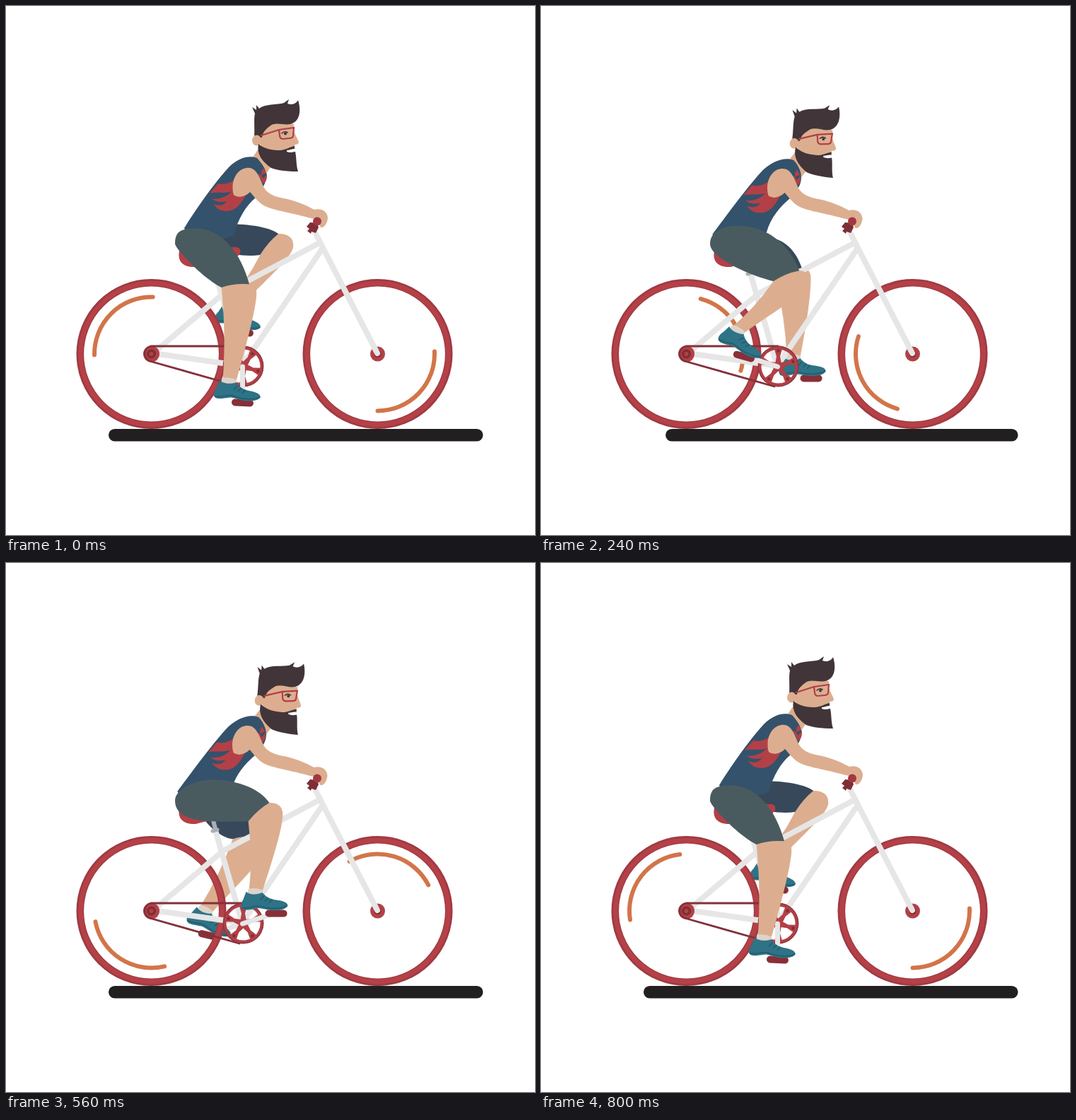
These frames come from a looping animation (748 px wide and 748 px high, 0.84 s). An HTML page:

```html
<!DOCTYPE html>
<html lang="en">
<head>
<meta charset="utf-8">
<title>Cyclist</title>
<style>
html, body { margin: 0; width: 100%; height: 100%; overflow: hidden; background: #fff; }
svg { display: block; width: 100vw; height: 100vh; }
.line { fill: none; stroke-linecap: round; }
.tube { fill: none; stroke: #e6e6e6; stroke-width: 8; stroke-linejoin: round; }
.crank { stroke-width: 7; stroke-linecap: round; }
.skin { fill: #dcae8f; }
.red { fill: #b34046; }
.dark { fill: #7f2e35; }
.hair { fill: #41353a; }
.sock { fill: #ddd3cb; }
.shoe { fill: #2e7386; }
.pedal { fill: #882f37; }
.blue { fill: #34526b; }
.ground { fill: #221f20; }
</style>
</head>
<body>
<svg viewBox="0 0 748 748" xmlns="http://www.w3.org/2000/svg">
  <defs>
    <g id="tyre">
      <circle r="100.7" class="line" stroke="#9f3a44" stroke-width="10.6"/>
      <circle r="100" class="line" stroke="#b54147" stroke-width="6.4"/>
    </g>
    <g id="foot">
      <path class="sock" d="M-10-3Q0-5 10-2L11 5-11 5Z"/>
      <path class="shoe" d="M-13 1C-9 5 1 6 10 2C14 7 20 11 28 12C38 13 46 15 46 20C44 25 35 27 26 27C18 27 10 24 4 24C-2 25-8 27-14 27C-22 26-21 18-17 12Z"/>
      <path class="line" stroke="#245b6c" stroke-width="1.6" d="M-18 24C-8 25-2 21 4 21C12 22 18 25 27 24C36 24 42 22 45 20M8 12L12 7M14 14L18 10M20 16L24 12"/>
    </g>
    <rect id="pedal" class="pedal" x="-15.5" y="-5" width="31" height="10" rx="5"/>
  </defs>

  <rect class="ground" id="road" y="598" height="17.5" rx="8.7"/>
  <rect class="ground" id="bit" y="598" height="17.5" rx="3.5" ry="5"/>

  <g id="far">
    <line class="tube crank"/>
    <use href="#pedal" class="pad"/>
    <path class="skin calf"/>
    <path class="shorts" fill="#37485a"/>
    <use href="#foot" class="boot"/>
  </g>

  <use href="#tyre" x="205.5" y="492"/>
  <use href="#tyre" x="525.5" y="492"/>
  <g class="line" stroke="#d27549" stroke-width="6">
    <path id="rear"/>
    <path id="front"/>
  </g>

  <path stroke="#a9afb5" stroke-width="6" d="M292 360L297 380"/>
  <path class="tube" d="M296 378L334 509M447 333L307 407L208 491L334 509L448 342"/>
  <path class="line" stroke="#a9afb5" stroke-width="5" d="M292 379L299 377"/>
  <path class="tube" d="M435 316L446 338"/>
  <circle class="red" cx="525.5" cy="492" r="10.5"/>
  <circle class="dark" cx="525.5" cy="492" r="5"/>
  <path class="tube" stroke-linecap="round" d="M444 334L525 491"/>
  <path class="red" d="M246 343C240 362 252 370 268 369C290 364 310 357 327 354C334 350 332 341 325 341Z"/>

  <circle class="red" cx="205.5" cy="492" r="11.5"/>
  <circle class="dark" cx="205.5" cy="492" r="6.5"/>
  <circle class="red" cx="205.5" cy="492" r="3"/>
  <path class="line" stroke="#84303a" stroke-width="2.8" d="M335 481H205A11 11 0 0 0 203 502L330 538"/>
  <g id="ring">
    <circle r="26.3" class="line" stroke="#b03f46" stroke-width="4.6"/>
    <circle r="28.3" class="line" stroke="#8e343d" stroke-width="1.2"/>
  </g>

  <g id="head">
    <path class="skin" d="M342 224L361 196L382 216L366 240Z"/>
    <path class="skin" d="M358 192L358 176C372 160 392 162 407 167L407 175C408 182 413 188 414 193C413 196 410 196 408 196L408 207L365 210Z"/>
    <path class="hair" d="M351 186C352 172 350 160 352 152L348 143L354 147L354 140L358 145C366 138 384 140 393 137L400 132L398 138C405 141 411 137 413 133C418 149 415 164 402 167C393 169 380 163 373 170C366 175 363 179 362 186Z"/>
    <ellipse class="skin" cx="354.5" cy="190" rx="6.5" ry="7.5"/>
    <path class="hair" d="M357 195C366 203 378 204 388 204C397 203 402 199 408 198L408 202C405 203 399 203 397 206L409 206C411 215 410 225 413 234C397 234 382 232 375 229C362 220 354 209 357 195Z"/>
    <path fill="#fff" d="M397 204C401 204 404 202 408 202L408 206Q402 208 397 206Z"/>
    <path class="line" stroke="#b13f49" stroke-width="2.2" d="M361 183L386 175L407 172L406 184Q405 187 401 187L391 188Q387 187 387 183L386 175"/>
    <path class="line" stroke="#41353a" stroke-width="1.6" d="M390 180Q394 176 398 179"/>
    <circle class="hair" cx="395" cy="180.5" r="2"/>
  </g>

  <path class="blue" id="torso"/>
  <g id="flame" class="red">
    <path d="M288 265L300 251C308 253 316 251 323 246C320 260 325 270 340 266C333 278 326 290 312 290C303 290 297 286 293 280C302 284 309 281 312 276C304 278 297 277 291 273C302 273 313 270 319 262C308 266 298 262 288 265Z"/>
    <path d="M364 229L369 238C369 246 368 249 363 251C361 245 358 240 355 237L361 239Q360 234 364 229Z"/>
    <path class="blue" d="M361 239L368 236 368 239 363 244Z"/>
  </g>
  <path class="skin" id="arm" d="M322 267C317 250 325 231 340 229C353 227 358 241 363 253C368 266 380 270 398 273C418 278 428 284 436 288C446 285 455 291 455 300C454 309 449 314 445 313L438 301C432 301 425 298 419 297C398 291 370 288 360 279C352 272 349 267 345 263C338 270 328 272 322 267Z"/>
  <path class="dark" d="M430 306L440 307L442 313L438 321L432 319L431 322L426 318L429 315L425 312Z"/>
  <circle cx="440" cy="304.5" r="6" fill="#a23741"/>

  <g id="near">
    <line class="tube crank"/>
    <use href="#pedal" class="pad"/>
    <path class="skin calf"/>
    <path class="shorts" fill="#4a5b60"/>
    <use href="#foot" class="boot"/>
  </g>
</svg>
<script>
const STEP = 40, STEPS = 21, TURN = 20;
const HUB = [334.5, 510], CRANK = 50;
const $ = s => document.querySelector(s);
const set = (el, attrs) => { for (const n in attrs) el.setAttribute(n, attrs[n]); };
const lerp = (a, b, u) => a + (b - a) * u;
const rad = d => d * Math.PI / 180;
const polar = (x, y, r, deg) => [x + r * Math.cos(rad(deg)), y + r * Math.sin(rad(deg))];
const pt = (...p) => p.map(v => v.toFixed(2)).join(" ");

// Cosine over one pedal turn, highest at step `peak`
const wave = (k, peak, n = 1) => Math.cos((k - peak) * n * 2 * Math.PI / TURN);

// The knee swings on an arc that is highest at step `peak`
const LEGS = {
  near: {
    knee: [355, 378], swing: [19, 35], wobble: 6, peak: 11.5, hip: [262, 340], shift: 0,
    waist: c => [280 + 14 * c, 310 - 5 * c], seat: () => [239, 336], sag: c => 23 + 18 * c
  },
  far: {
    knee: [362, 377], swing: [24, 36], wobble: 0, peak: 10.8, hip: [285, 338], shift: 4,
    waist: c => [318, 326 - 18 * c], seat: c => [279, 349 - 16 * c], sag: () => 9
  }
};

function drawLeg(name, k) {
  const leg = LEGS[name], part = c => $("#" + name + " ." + c);
  const c = wave(k, leg.peak), c2 = wave(k, 6, 2);

  const [px, py] = polar(...HUB, CRANK, 90 + 18 * k);
  const tilt = 26 * ((1 + wave(k, 6)) / 2) ** 1.6;
  const ax = px - 19 + 11 * wave(k, 5) + leg.shift, ay = py - 33 - 4 * wave(k, 7);
  set(part("crank"), { x1: HUB[0], y1: HUB[1], x2: px, y2: py });
  set(part("pad"), { transform: `translate(${pt(px, py + 1)}) rotate(${tilt * .6})` });
  set(part("boot"), { transform: `translate(${pt(ax, ay)}) rotate(${tilt})` });

  // Knee joint, and the hem that sits square on the thigh above it
  const jx = leg.knee[0] + leg.swing[0] * c + leg.wobble * c2;
  const jy = leg.knee[1] - leg.swing[1] * c + 5 * c2;
  const thigh = Math.atan2(jy - leg.hip[1], jx - leg.hip[0]);
  const cos = Math.cos(thigh), sin = Math.sin(thigh);
  const onThigh = (u, v) => [jx + u * cos - v * sin, jy + u * sin + v * cos];
  const [fx, fy] = onThigh(0, -16), [bx, by] = onThigh(-26, 14), inner = onThigh(-32, 0);

  const kx = jx + 21, ky = jy + 1;
  const back = polar(ax, ay, -9, tilt), shin = polar(ax, ay, 10, tilt);
  const dx = kx - shin[0], dy = ky - shin[1], len = Math.hypot(dx, dy);
  const nx = -dy / len, ny = dx / len;
  set(part("calf"), {
    d: `M${pt(bx, by)}Q${pt((bx + back[0]) / 2 + nx * 6, (by + back[1]) / 2 + ny * 6, ...back)}L${pt(...shin)}` +
       `C${pt(shin[0] + dx * .6 + nx * 4, shin[1] + dy * .6 + ny * 4, kx, ky + 14, kx, ky)}` +
       `Q${pt(kx, fy, fx, fy)}L${pt(...inner)}Z`
  });

  const [tx, ty] = leg.waist(c), [hx, hy] = leg.seat(c), w = fx - tx, h = fy - ty;
  set(part("shorts"), {
    d: `M${pt(hx, hy)}C${pt(hx, hy - 16, tx - 22, ty, tx, ty)}` +
       `C${pt(tx + w * .5, ty, tx + w * .85, ty + h * .45, fx, fy)}` +
       `Q${pt((fx + bx) / 2 - 1, (fy + by) / 2 - 4, bx, by)}` +
       `C${pt(lerp(bx, hx, .4), lerp(by, hy, .4) + 12, hx, hy + leg.sag(c), hx, hy)}Z`
  });
}

// Blends two paths that share the same commands
function mix(a, b, u) {
  const to = b.match(/[\d.]+/g);
  let i = 0;
  return a.replace(/[\d.]+/g, v => lerp(+v, +to[i++], u).toFixed(2));
}
const TORSO = [
  "M252 314C270 285 295 250 315 228C330 213 345 211 355 215C362 223 368 231 368 239C369 251 360 262 352 272C340 282 328 300 322 325L262 340Z",
  "M239 326C258 302 285 265 309 238C325 221 344 214 358 219C364 225 368 235 368 243C368 255 360 265 352 272C338 284 324 298 318 318L250 340Z"
];

function drawArc(id, x, from) {
  const a = polar(x, 492, 80.5, from), b = polar(x, 492, 80.5, from + 92.5);
  set($(id), { d: `M${pt(...a)}A80.5 80.5 0 0 1 ${pt(...b)}` });
}

// A piece breaks off the road, drifts left and shrinks while the road grows back
function drawRoad(k) {
  const u = k < 8 ? k / 8 : (k - 8) % 6 / 6;
  const left = u ? 222 - 77 * u ** 1.8 : 145;
  set($("#road"), { x: left, width: 674.5 - left });
  set($("#bit"), {
    x: Math.max(64, 145 - 175 * u ** 1.5),
    width: u ? Math.max(0, 35.5 - 48 * u - (u > .65 ? 9 : 0)) : 0
  });
}

function draw(k) {
  const pose = k % TURN;
  const p = 1 - Math.abs(pose - 10) / 10;
  const lean = p < .5 ? 4 * p ** 3 : 1 - 4 * (1 - p) ** 3;

  drawLeg("near", pose);
  drawLeg("far", (pose + TURN / 2) % TURN);
  set($("#ring"), { transform: `translate(335.5 509.5) rotate(${90 + 18 * pose})` });

  // The wheels drift apart late in the loop, then meet again
  const drift = Math.max(0, Math.min((k - 8) / 8, (20 - k) / 4));
  drawArc("#rear", 205.5, 179 + 17.6 * k + 15 * drift);
  drawArc("#front", 525.5, -2.5 + 18 * k - 12 * drift);

  set($("#head"), { transform: `translate(0 ${12 * lean}) rotate(${6.2 * lean} 413 233)` });
  set($("#flame"), { transform: `translate(${-2.5 * lean} ${3.5 * lean})` });
  set($("#arm"), { transform: `translate(${-.7 * lean} ${1.5 * lean})` });
  set($("#torso"), { d: mix(...TORSO, lean) });
  drawRoad(k);
}

// Five spokes with bolts inside the chainring
for (let i = 0; i < 5; i++) {
  $("#ring").insertAdjacentHTML("beforeend",
    `<g transform="rotate(${i * 72})"><path class="red" d="M0-5L14-2.5 26-6V6L14 2.5 0 5Z"/><circle class="dark" cx="22" r="2.2"/></g>`);
}

let last = -1;
function tick() {
  const k = Math.floor(performance.now() % (STEP * STEPS) / STEP);
  if (k !== last) draw(last = k);
  requestAnimationFrame(tick);
}
tick();
</script>
</body>
</html>
```
